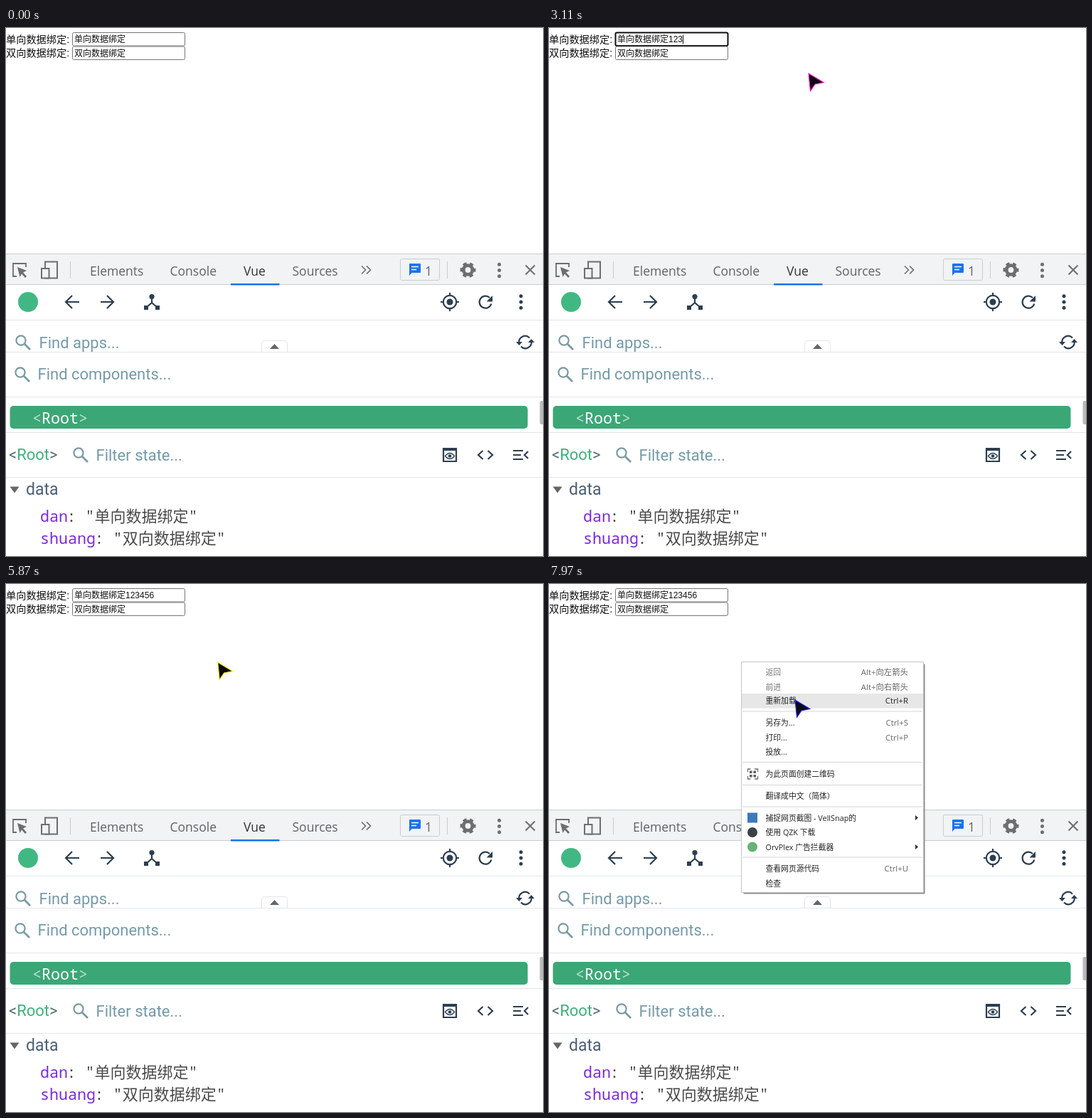
Write an HTML page that moves like this. It is 755 px wide and 742 px high and loops after 8 s.

```html
<!DOCTYPE html>
<html lang="zh-CN">
<head>
<meta charset="utf-8">
<title>Data binding</title>
<style>
html, body { margin: 0; width: 100%; height: 100%; overflow: hidden; background: #fff; }
svg { display: block; width: 100vw; height: 100vh; }
text { white-space: pre; }
.page { font: 14.2px "Liberation Sans", "Noto Sans CJK SC", "Noto Sans CJK", sans-serif; fill: #111; }
.field { font-size: 12px; }
.box { fill: #fff; stroke: #767676; }
.tabs { font: 17.5px "Open Sans", "Noto Sans", sans-serif; fill: #5f6368; }
.find { font: 22px Roboto, sans-serif; fill: #749aa8; }
.find .head { font-size: 23px; fill: #4b6075; }
.mono { font: 21.7px "Noto Sans Mono", "DejaVu Sans Mono", monospace; fill: #444; }
.cjk { font: 300 22px "Noto Sans CJK SC Light", "Noto Sans CJK SC", "Noto Sans CJK", sans-serif; fill: #4a4a4a; }
.key { fill: #7c2bd9; }
.line { fill: none; }
.grey { stroke: #6e6e6e; }
.dark { stroke: #2c3e50; }
.darkfill { fill: #2c3e50; }
.rule { stroke: #e3e6ea; }
.menu { font: 10.8px "Open Sans", "Noto Sans CJK SC", "Noto Sans CJK", sans-serif; fill: #222; }
.menu .hot { font-size: 11.4px; fill: #666; text-anchor: end; }
.menu .off { fill: #777; }
.menu .on { fill: #222; }
</style>
</head>
<body>
<svg viewBox="0 0 755 742" preserveAspectRatio="none">
  <defs>
    <g id="lens" class="line" stroke="#7899a3" stroke-width="2.2"><circle r="6.6"/><path d="M5 5l8 8" stroke-width="2.6"/></g>
    <g id="dots"><circle cy="-8.3" r="2.5"/><circle r="2.5"/><circle cy="8.3" r="2.5"/></g>
  </defs>

  <g class="page">
    <text y="20.5">单向数据绑定:</text>
    <text y="40">双向数据绑定:</text>
    <rect class="box" id="first" x="93.5" y="6.5" width="158" height="18.5" rx="2"/>
    <rect class="box" x="93.5" y="26" width="158" height="18.5" rx="2"/>
    <text class="field" x="96" y="20">单向数据绑定<tspan id="typed"></tspan></text>
    <text class="field" x="96" y="39.5">双向数据绑定</text>
    <rect id="caret" y="9.5" width="1" height="13"/>
  </g>

  <path d="M0 318h755v42H0z" fill="#f1f3f4"/>
  <path d="M0 317.5h755M0 360.5h755" stroke="#cacdd1"/>
  <path d="M316 359h68.5v2.6H316z" fill="#1a73e8"/>
  <g class="line grey" stroke-width="2">
    <path d="M15 349h-5v-18h18v5" stroke-width="1.8"/>
    <path d="M16 336l13 5-5 2.5 5 5.5-2 2-5-5.5-2.5 4.5z" fill="#6e6e6e" stroke="none"/>
    <rect x="55" y="328.5" width="17" height="23"/>
    <rect x="50" y="338" width="10.5" height="13.5" fill="#f1f3f4"/>
    <path d="M500 334.5l5.5 5.5-5.5 5.5M507 334.5l5.5 5.5-5.5 5.5" stroke-width="1.6"/>
    <circle cx="649.5" cy="340" r="6.3" stroke-width="4.8"/>
    <circle cx="649.5" cy="340" r="9" stroke-width="4" stroke-dasharray="5 4.425" stroke-dashoffset="2.5"/>
    <path d="M730.5 333.5l13 13m0-13l-13 13"/>
  </g>
  <path d="M90.5 328v24M620.5 328v24" stroke="#cacdd1"/>
  <use href="#dots" x="693.5" y="340.5" fill="#6e6e6e"/>
  <rect x="554.5" y="324.5" width="55" height="30" rx="2" fill="none" stroke="#cacdd1"/>
  <path d="M568 331h14q1 0 1 1v11q0 1-1 1h-11.5l-3.5 4v-16q0-1 1-1z" fill="#1a73e8"/>
  <path d="M570 335.5h10M570 339.5h7" stroke="#fff" stroke-width="1.5"/>
  <g class="tabs">
    <text x="118" y="347.5">Elements</text>
    <text x="230.5" y="347.5">Console</text>
    <text x="334" y="347.5" fill="#333">Vue</text>
    <text x="402.5" y="347.5">Sources</text>
    <text x="589" y="347.5">1</text>
  </g>

  <circle cx="31" cy="385" r="14" fill="#41b883"/>
  <path class="rule" d="M0 410.5h755M0 455.5h755M0 518.5h755M0 568.5h755M0 631.5h755"/>
  <g class="line dark" stroke-width="2.2">
    <path d="M103 385H85M93 376l-9 9 9 9M133 385h18M142 376l9 9-9 9"/>
    <path d="M205 377v9l-8 7m8-7l8 7"/>
    <circle cx="624" cy="385" r="9.2"/>
    <path d="M624 372v4M624 394v4M611 385h4M633 385h4"/>
    <path d="M680 379a8.5 8.5 0 1 0 2.3 8.5"/>
    <path d="M721.5 443a8.5 8.5 0 0 1 14.5-7.5M738.5 440a8.5 8.5 0 0 1-14.5 7.5"/>
    <path d="M615 591h18v18h-18z"/>
    <path d="M615 592h18" stroke-width="4"/>
    <path d="M617.5 601.5q6.5-8 13 0-6.5 8-13 0z" stroke-width="1.5"/>
    <path d="M670.5 594l-6.5 6 6.5 6M677.5 594l6.5 6-6.5 6"/>
    <path d="M713 594h14M713 600h11M713 606h14M734 595l-5 5 5 5"/>
  </g>
  <g class="darkfill">
    <circle cx="205" cy="377.5" r="3.6"/>
    <path d="M194 390h6v6h-6zM210 390h6v6h-6z"/>
    <circle cx="624" cy="385" r="4.5"/>
    <path d="M684 376v8.5h-8.5zM717 441h9l-4.5 5zM734 442h9l-4.5-5z"/>
    <circle cx="624" cy="601.5" r="2.3"/>
    <use href="#dots" x="724" y="385"/>
  </g>

  <use href="#lens" x="21" y="439"/>
  <use href="#lens" x="20" y="484"/>
  <use href="#lens" x="102" y="597"/>
  <g class="find">
    <text x="46.5" y="449.5">Find apps...</text>
    <text x="44.5" y="494">Find components...</text>
    <text x="126.5" y="607.5">Filter state...</text>
    <text x="4" y="607" fill="#5b6b77">&lt;<tspan fill="#3fb07c">Root</tspan>&gt;</text>
    <text x="28" y="655.5" class="head">data</text>
  </g>
  <path d="M359.5 455v-11q0-4.5 4.5-4.5h27q4.5 0 4.5 4.5v11" fill="#fff" class="rule"/>
  <path d="M371 451l6.5-7 6.5 7zM5.5 644.5h13l-6.5 9z" fill="#666"/>

  <rect x="5.5" y="531" width="728" height="32" rx="5" fill="#3ba776"/>
  <rect x="750.5" y="524" width="6" height="33" rx="2" fill="#b8babb"/>
  <g class="mono">
    <text x="37" y="556" style="fill:#b9dfcd">&lt;<tspan fill="#fff">Root</tspan>&gt;</text>
    <text x="48" y="694"><tspan class="key">dan</tspan><tspan dx="-1.5">: "</tspan><tspan class="cjk">单向数据绑定</tspan>"</text>
    <text x="48" y="725"><tspan class="key">shuang</tspan><tspan dx="-1.5">: "</tspan><tspan class="cjk">双向数据绑定</tspan>"</text>
  </g>

  <g class="menu" id="menu">
    <path d="M273.5 112.5h255v323h-255z" fill="#8c8c8c"/>
    <path d="M270.5 109.5h256v324h-256z" fill="#fff" stroke="#c4c4c4"/>
    <rect id="hover" x="271" width="255" height="20.6" fill="#e7e7e7"/>
    <path d="M272 179h253M272 250.5h253M272 282.5h253M272 313h253M272 384h253" stroke="#d5d5d5"/>
    <path d="M279.5 264v-4h4M289 260h4.500v4M293.500 270v4h-4.500M283.500 274h-4v-4" class="line grey" stroke-width="1.3"/>
    <path d="M282 262.500h3.600v3.600h-3.600zM287.400 262.500h3.600v3.600h-3.600zM282 268h3.600v3.600h-3.600zM287.400 268h3.600v3.600h-3.600z" fill="#5f6368"/>
    <rect x="279" y="321.5" width="14" height="14" fill="#3f78b8"/>
    <circle cx="286" cy="349" r="7" fill="#3b4046"/>
    <circle cx="286" cy="369.5" r="7" fill="#67b279"/>
    <path d="M515 325l4 3.5-4 3.5zM515 366l4 3.5-4 3.5z" fill="#333"/>
    <g id="items"></g>
  </g>

  <path id="arrow" d="M0 0L21 12.5 9 15 2.5 24.5z" fill="#0b0b10" stroke-width="1.1"/>
  <path id="beam" d="M-3.5-8h7M0-8V8M-3.5 8h7" fill="none" stroke="#111" stroke-width="1.3"/>
</svg>
<script>
const $ = id => document.getElementById(id);
const show = (el, on) => el.style.display = on ? '' : 'none';
const LOOP = 8000, FOCUS = 1000, BLUR = 4300, MENU = 6080;

// Centre line, label, shortcut, disabled
const rows = [
  [124, '返回', 'Alt+向左箭头', 1],
  [144.5, '前进', 'Alt+向右箭头', 1],
  [164.3, '重新加载', 'Ctrl+R'],
  [195, '另存为...', 'Ctrl+S'],
  [215.5, '打印...', 'Ctrl+P'],
  [236, '投放...'],
  [267, '为此页面创建二维码'],
  [298, '翻译成中文（简体）'],
  [328.5, '捕捉网页截图 - VellSnap的'],
  [349, '使用 QZK 下载'],
  [369.5, 'OrvPlex 广告拦截器'],
  [400, '查看网页源代码', 'Ctrl+U'],
  [421, '检查']
];
$('items').innerHTML = rows.map(([y, label, hot = '', off]) =>
  `<text x="304.5" y="${y + 4}"${off ? ' class="off"' : ''}>${label}</text>` +
  `<text x="505" y="${y + 4}" class="hot">${hot}</text>`).join('');
const shortcuts = document.querySelectorAll('.hot');

// Time, x, y of the pointer tip
const path = [
  [390, 558, 666], [480, 400, 408], [570, 305, 213], [660, 272, 116], [750, 255, 50],
  [900, 185, 16], [1540, 185, 16], [1850, 365, 64], [5450, 365, 64], [5870, 298, 110],
  [5980, 262, 112], [MENU, 270, 109], [6240, 270, 109], [6620, 365, 279], [6720, 365, 279],
  [6980, 356, 300], [7100, 354, 306], [7300, 353, 298], [7500, 353, 298],
  [7830, 347, 188], [7960, 346, 163], [LOOP, 346, 163]
];
const keys = [2400, 2700, 2930, 3150, 3370, 3600];
const edges = ['#f0f', '#22f', '#f0c', '#fe0', '#f0c', '#63f', '#f0c', '#f0a'];

function pointer(t) {
  const i = Math.max(1, path.findIndex(p => p[0] >= t));
  const [a, b] = [path[i - 1], path[i]];
  const k = Math.max(0, (t - a[0]) / (b[0] - a[0]));
  return [a[1] + (b[1] - a[1]) * k, a[2] + (b[2] - a[2]) * k];
}

function draw(t) {
  const focused = t >= FOCUS && t < BLUR;
  $('first').style.stroke = focused ? '#101010' : '';
  $('first').style.strokeWidth = focused ? 2 : 1;

  const count = keys.filter(k => k <= t).length;
  $('typed').textContent = '123456'.slice(0, count);
  const since = t - (count ? keys[count - 1] : t < 1500 ? FOCUS : 1500);
  $('caret').setAttribute('x', 168 + count * 6.67);
  show($('caret'), focused && since % 1060 < 530);

  const [x, y] = pointer(t);
  const row = rows.find(r => !r[3] && Math.abs(r[0] - y) < 10.3);
  show($('menu'), t >= MENU);
  show($('hover'), row);
  if (row) $('hover').setAttribute('y', row[0] - 10.3);
  shortcuts.forEach((el, i) => el.classList.toggle('on', rows[i] === row));

  const inField = x > 94 && x < 251 && y > 6 && y < 45;
  for (const id of ['arrow', 'beam']) {
    $(id).setAttribute('transform', `translate(${x} ${y})`);
    show($(id), t >= 390 && (id === 'beam') === inField);
  }
  $('arrow').setAttribute('stroke', edges[Math.floor(t / 70) % 8]);
}

const start = performance.now();
function tick() {
  draw((performance.now() - start) % LOOP);
  requestAnimationFrame(tick);
}
tick();
</script>
</body>
</html>
```
